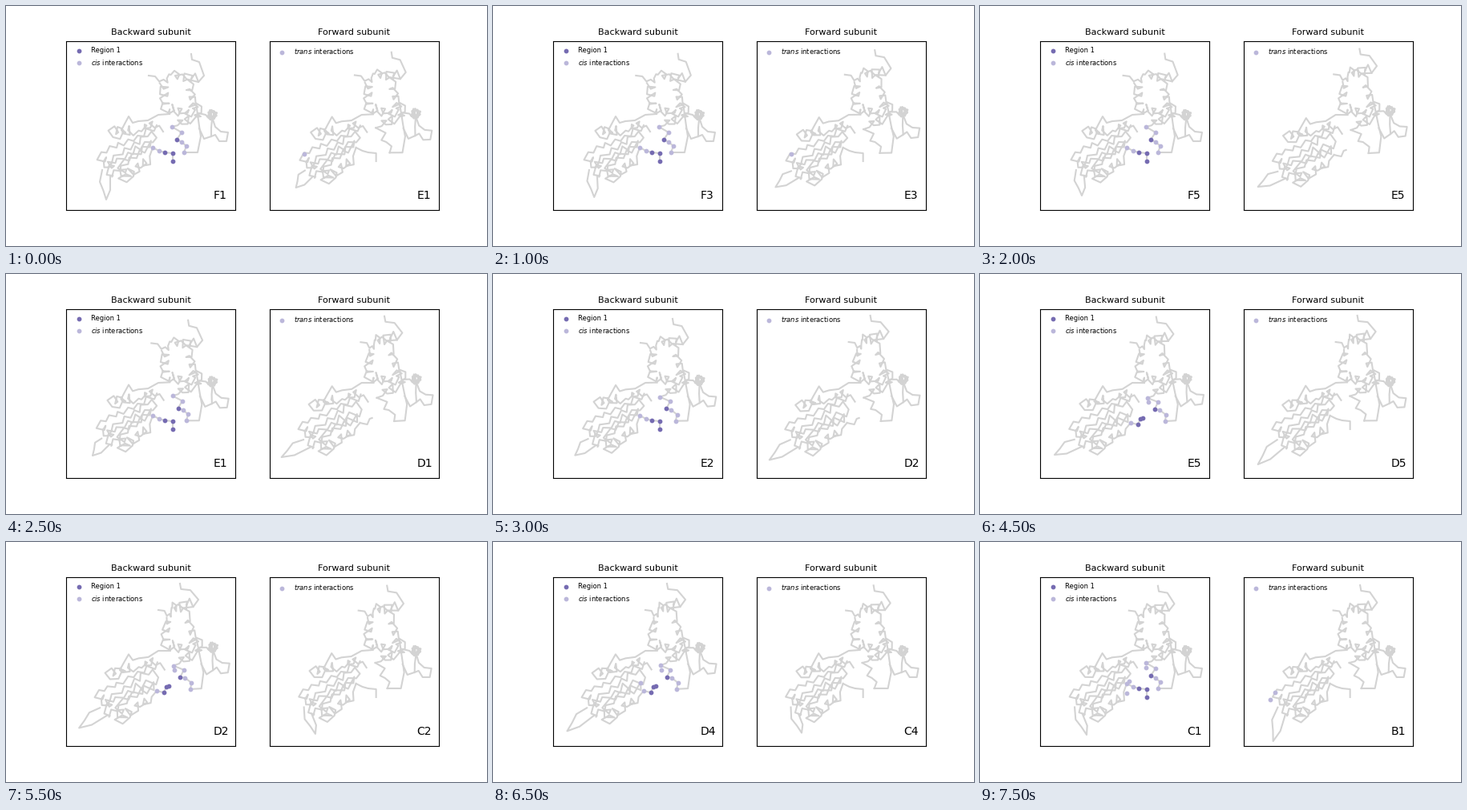
Write a matplotlib script that moves like this. It is 600x300 px and loops after 8 s.

```python
import numpy as np
import matplotlib.pyplot as plt
from matplotlib.animation import FuncAnimation
from matplotlib.collections import LineCollection

plt.rcParams["font.family"] = "DejaVu Sans"
W, H, SIDE = 600, 300, 211.36
X0, Y0 = 75, 43.9
DARK, PALE, GREY = "#756bb1", "#bbb7da", "lightgray"
rng = np.random.default_rng(4)


def axis(a, b, n):
    """Points from a to b, the unit vector along them and its normal."""
    a, b = np.array(a, float), np.array(b, float)
    along = (b - a) / np.hypot(*(b - a))
    u = np.linspace(0, 1, n)[:, None]
    return a + u * (b - a), along, np.array([-along[1], along[0]])


def helix(a, b, n, r=5.5, jitter=1.2):
    """Flat view of an alpha helix, 100 degrees per residue."""
    pts, along, across = axis(a, b, n)
    t = np.radians(100) * np.arange(n)[:, None]
    turn = np.cos(t) * across + .8 * np.sin(t) * along
    return pts + r * turn + rng.normal(0, jitter, pts.shape)


def strand(a, b, r=2.5):
    """Pleated strand with one residue about every 7 pixels."""
    n = int(np.hypot(b[0] - a[0], b[1] - a[1]) / 7) + 2
    pts, _, across = axis(a, b, n)
    side = (-1) ** np.arange(n)[:, None]
    return pts + r * side * across + rng.normal(0, 1.2, pts.shape)


def path(*pts):
    return np.array(pts, float)


# Marked residues in chain order, with the loop outside and inside.
OUTSIDE = path((183, 177), (191, 181), (198, 183), (208, 184), (208, 194),
               (222, 183), (225, 175), (219, 170), (213, 167), (219, 158),
               (207, 151))
INSIDE = path((188, 186), (192, 187), (197, 188), (200, 181), (203, 180),
              (231, 184), (232, 176), (224, 170), (218, 169), (222, 160),
              (209, 155))
REGION = [2, 3, 4, 8]

head = [path((231, 60), (232, 67), (241, 70), (247, 87), (240, 95)),
        helix((236, 90), (208, 86), 13),
        helix((205, 90), (194, 95), 5, 4),
        path((186, 88), (178, 87))]
core = [helix((196, 97), (199, 132), 14),
        helix((204, 129), (236, 134), 14),
        helix((234, 128), (229, 96), 13),
        path((240, 95))]
arm = [OUTSIDE[-1:], helix((212, 146), (232, 140), 9),
       helix((240, 141), (241, 124), 6, 4), path((241, 150), (243, 163),
                                                 (239, 183), (222, 183))]
knob = [path((240, 134), (249, 136)), helix((255, 136), (259, 136), 15, 6, .4),
        path((257, 142), (256, 152), (256, 163), (247, 166), (241, 153))]
hook = [path((256, 163), (261, 161), (266, 169), (275, 169), (277, 158),
             (268, 157), (261, 151), (258, 142))]
ribbon = [path((204, 135), (190, 136), (177, 143), (165, 144), (158, 146),
               (153, 138)),
          helix((150, 153), (131, 157), 10), helix((140, 161), (162, 154), 9),
          helix((168, 151), (188, 148), 9), path((196, 157))]
sheet = [strand((188, 152), (146, 172)), strand((140, 172), (118, 184)),
         helix((119, 189), (125, 201), 6),
         strand((131, 192), (182, 158)), strand((186, 165), (135, 196)),
         helix((131, 197), (130, 209), 6)]
bottom = [strand((130, 212), (172, 180)), strand((182, 170), (148, 194)),
          helix((145, 203), (150, 217), 9), helix((155, 211), (178, 193), 13),
          OUTSIDE[:1]]
PIECES = [np.vstack(p) for p in (head, core, arm, knob, hook, ribbon, sheet,
                                 bottom)]
ROOTS = path((130, 212), (120, 205))

# Anchor at rest, then how far it moves when the subunit swings or bends.
ANCHORS = np.array([
    [(231, 60), (-14, -8), (0, 0)],
    [(178, 87), (12, -2), (0, 0)],
    [(247, 87), (-7, -15), (0, 0)],
    [(127, 157), (-4, 8), (0, 0)],
    [(150, 222), (-5, 7), (0, 0)],
    [(114, 193), (-3, 2), (0, 0)],
    [(277, 158), (0, 0), (2, -7)],
    [(257, 136), (1, 0), (0, -5)],
    [(190, 136), (0, 0), (0, 0)],
    [(165, 165), (0, 0), (0, 0)],
    [(220, 130), (0, 0), (0, 0)],
], float)

# Tail tip at the first and last step of each subunit F, E, D, C, B.
FEET = np.array([[(125, 242), (127, 237)], [(108, 227), (93, 226)],
                 [(90, 229), (93, 238)], [(133, 241), (131, 238)],
                 [(112, 249), (112, 249)]], float)

# Further cis contacts: first step, last step, place.
CONTACTS = [(9, 14, (210, 160)), (12, 14, (184, 176)), (15, 19, (207, 157)),
            (15, 19, (186, 174)), (15, 19, (183, 189))]


def swing(k):
    return np.interp(k, [0, 4, 6, 11, 14, 15, 20], [0, .05, .5, 1, 1, .65, .75])


def bend(k):
    return np.interp(k, [4, 6, 9, 13, 15], [0, .65, 1, .8, 0])


def inside(k):
    return 9 <= k < 14


def loop(k):
    mix = np.full((len(OUTSIDE), 1), bend(k))
    mix[:5] = inside(k)
    return OUTSIDE + mix * (INSIDE - OUTSIDE)


def pose(k):
    rest, swung, bent = ANCHORS.transpose(1, 0, 2)
    return np.vstack([rest + swing(k) * swung + bend(k) * bent, loop(k)])


def foot(k):
    first, last = FEET[k // 5]
    return first + (k % 5 / 4) ** .7 * (last - first)


REST = pose(0)


def warp(pts, shift):
    """Move points by the shifts of the nearest anchors."""
    d = np.linalg.norm(pts[:, None] - REST[None], axis=2)
    w = 1 / (d ** 3 + 1e-6)
    return pts + (w @ shift) / w.sum(axis=1, keepdims=True)


def tail(roots, end):
    a, b = roots
    _, _, side = axis((a + b) / 2, end, 2)
    return np.array([a, a + .6 * (end - a) - 3 * side, end,
                     b + .7 * (end - b) + 2 * side,
                     b + .4 * (end - b) + 5 * side, b])


def chain(k):
    shift = pose(k) - REST
    marked = loop(k)
    return [warp(p, shift) for p in PIECES] + [
        marked[:5], marked[5:], tail(warp(ROOTS, shift), foot(k))]


def cis_sites(k):
    hidden = REGION + [1] * inside(k)
    return np.vstack([np.delete(loop(k), hidden, axis=0)]
                     + [[p] for a, b, p in CONTACTS if a <= k <= b])


def trans_sites(k):
    if k <= 7:
        return [(118.2, 184.5)]
    return [(108.5, 197), (114.3, 188)] if k >= 20 else np.empty((0, 2))


def name(k):
    return "FEDCB"[k // 5] + str(k % 5 + 1)


def panel(left, title):
    ax = fig.add_axes([left / W, 1 - (Y0 + SIDE) / H, SIDE / W, SIDE / H])
    ax.set(xlim=(X0, X0 + SIDE), ylim=(Y0 + SIDE, Y0), xticks=[], yticks=[])
    ax.set_title(title, fontsize=8)
    lines = ax.add_collection(LineCollection(
        [], colors=GREY, linewidths=1.5, joinstyle="round",
        capstyle="projecting"), autolim=False)
    label = ax.text(.869, .068, "", fontsize=10, transform=ax.transAxes)
    return ax, lines, label


def dots(ax, color, label):
    return ax.scatter([], [], s=10, color=color, label=label, zorder=3)


fig = plt.figure(figsize=(W / 100, H / 100), dpi=100, facecolor="white")
back, back_lines, back_name = panel(X0, "Backward subunit")
fore, fore_lines, fore_name = panel(540 - SIDE, "Forward subunit")
region = dots(back, DARK, "Region 1")
cis = dots(back, PALE, r"$\it{cis}$ interactions")
trans = dots(fore, PALE, r"$\it{trans}$ interactions")
for ax in (back, fore):
    ax.legend(loc="upper left", fontsize=6, frameon=False)


def draw(i):
    k = i + 5  # the forward subunit is one letter further
    back_lines.set_segments(chain(i))
    fore_lines.set_segments(chain(k))
    region.set_offsets(loop(i)[REGION])
    cis.set_offsets(cis_sites(i))
    trans.set_offsets(trans_sites(k))
    back_name.set_text(name(i))
    fore_name.set_text(name(k))
    return back_lines, fore_lines, region, cis, trans, back_name, fore_name


anim = FuncAnimation(fig, draw, frames=16, interval=500, repeat=True,
                     repeat_delay=0, blit=False)
plt.show()
```
